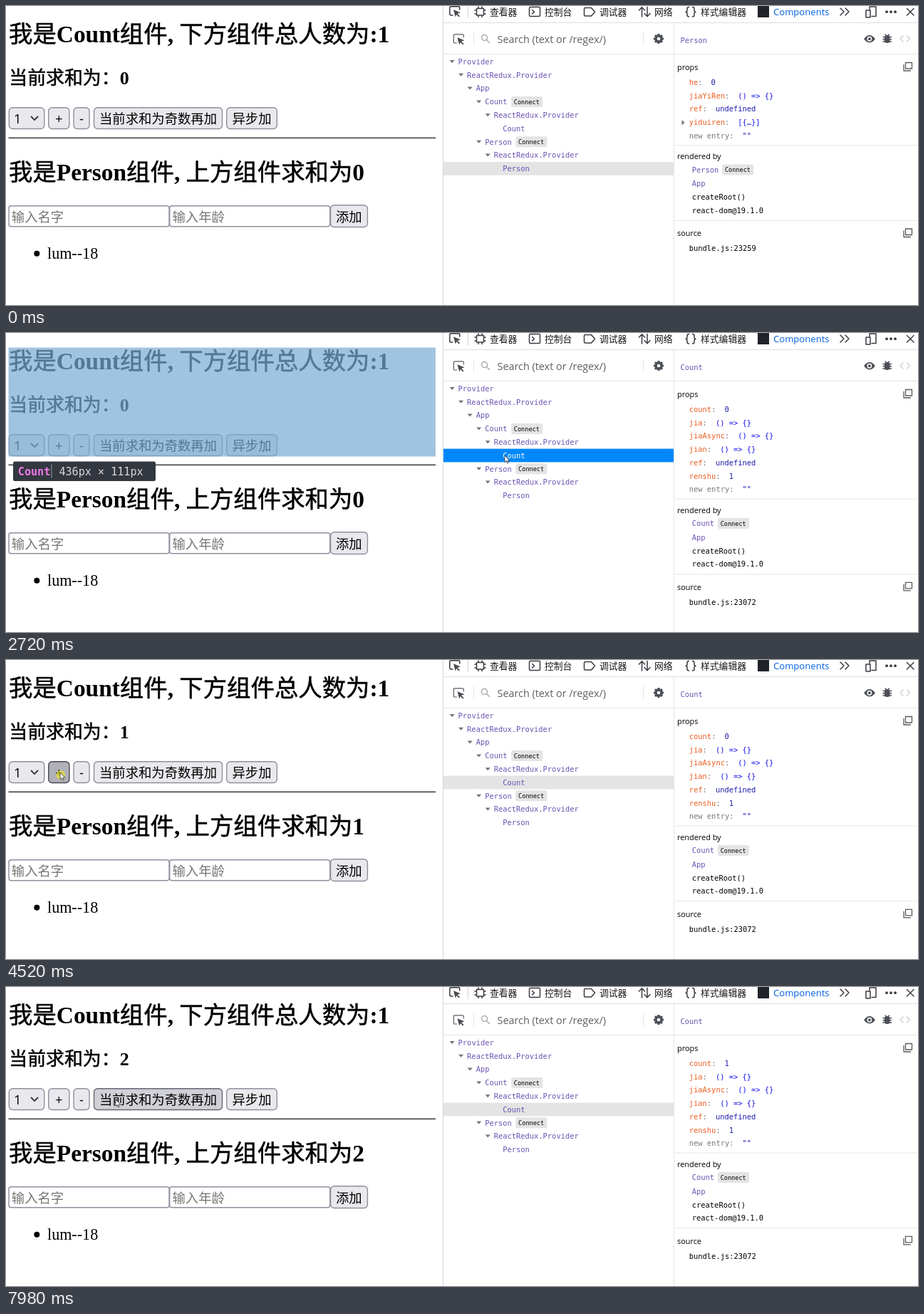
An HTML page that plays this animation: 1280 px wide and 420 px high, repeating every 8000 ms.

```html
<!DOCTYPE html>
<html lang="zh">
<head>
<meta charset="utf-8">
<style>
html, body { margin: 0; width: 100%; height: 100%; overflow: hidden; background: #fff; }
svg { display: block; width: 1280px; height: 420px; }
text { white-space: pre; }
.h { font: bold 33.4px "Liberation Serif", "Noto Sans CJK SC", serif; }
.h3 { font: bold 25.9px "Liberation Serif", "Noto Sans CJK SC", serif; }
.han { font-weight: 400; stroke: #000; stroke-width: .5; }
.li { font: 22.1px "Liberation Serif", serif; }
.btn { font: 18.35px "Open Sans", "Noto Sans CJK SC", sans-serif; }
.tab { font: 12.8px "Open Sans", "Noto Sans CJK SC", sans-serif; fill: #18181a; }
.ui { font: 10.9px "Open Sans", sans-serif; }
.find { font: 14.4px "Open Sans", sans-serif; }
.m { font: 10.42px "DejaVu Sans Mono", monospace; }
.badge { font: 8.55px "DejaVu Sans Mono", monospace; }
.tip { font: 15.1px "DejaVu Sans Mono", monospace; }
.ic { fill: none; stroke: #3b3b42; stroke-width: 1.5; stroke-linejoin: round; stroke-linecap: round; }
.thin { stroke-width: 1.2; stroke: #5a5a60; }
</style>
</head>
<body>
<svg id="stage" viewBox="0 0 1280 420" xmlns="http://www.w3.org/2000/svg"></svg>
<script>
const LOOP = 8000, LAG = 80, CH = 6.273;
const PURPLE = '#6a51b2', ORANGE = '#ec5c20', BLUE = '#1a1aa6', VIVID = '#1010ee', DIM = '#777';

const text = (x, y, cls, s, fill = '#000', more = '') =>
  `<text x="${x}" y="${y}" class="${cls}" fill="${fill}" ${more}>${s}</text>`;
const rect = (x, y, w, h, fill, more = '') =>
  `<rect x="${x}" y="${y}" width="${w}" height="${h}" fill="${fill}" ${more}/>`;
const icon = (d, more = '') => `<path class="ic" d="${d}" ${more}/>`;
const line = (x1, y1, x2, y2, c = '#e6e6e8') =>
  `<path d="M${x1} ${y1}L${x2} ${y2}" stroke="${c}" fill="none"/>`;
const badge = (x, y) =>
  rect(x, y - 7.5, 44, 15, '#e4e4e4', 'rx="2"') + text(x + 3.7, y + 3.2, 'badge', 'Connect');
// Chinese runs of a heading are lighter than its Latin letters
const heading = s => s.replace(/[^\x00-\x7f]+/g, '<tspan class="han">$&</tspan>');

/* ---- page ---- */
const buttons = [
  { x: 59.7, w: 29.2, s: '+' },
  { x: 95, w: 22, s: '-' },
  { x: 123.5, w: 180, s: '当前求和为奇数再加' },
  { x: 309.7, w: 70.6, s: '异步加' }
];
const LOOKS = [['#e9e9ed', '#8f8f9d'], ['#d0d0d7', '#676774'], ['#b1b1b9', '#484851']];
const face = (x, y, w, h, id = '') =>
  rect(x, y, w, h, LOOKS[0][0], `${id} rx="5" stroke="${LOOKS[0][1]}" stroke-width="1.4"`);
const input = (x, s) =>
  rect(x, 280.7, 225, 29, '#fff', 'rx="3" stroke="#8f8f9d" stroke-width="1.4"') +
  text(x + 3.8, 302.8, 'btn', s, '#757575');

function page() {
  return text(4, 50.6, 'h', heading('我是Count组件, 下方组件总人数为:1')) +
    text(4.3, 109.5, 'h3', '', '#000', 'id="sum"') +
    face(4.3, 142.7, 49.4, 29.8) + text(11, 164.7, 'btn', '1') +
    icon('M35.5 155.5l4.5 4.6 4.5-4.6', 'style="stroke-width:2"') +
    buttons.map((b, i) => face(b.x, 142.7, b.w, 29.8, `id="b${i}"`) +
      text(b.x + b.w / 2, 164.7, 'btn', b.s, '#000', 'text-anchor="middle"')).join('') +
    rect(3.5, 184.3, 599.5, 2, '#606060') +
    text(4, 244.5, 'h', '', '#000', 'id="upper"') +
    input(4, '输入名字') + input(229.7, '输入年龄') +
    face(455.6, 279.7, 51.8, 30.8) + text(463, 302.8, 'btn', '添加') +
    '<circle cx="43.3" cy="347.800" r="4"/>' + text(58, 354.6, 'li', 'lum--18');
}

/* ---- tool bars ---- */
const picker = (x, y, cls) =>
  `<g transform="translate(${x} ${y})"><path class="ic ${cls}" d="M5 13H2.5Q.8 13 .8 11.3V2.5Q.8 .8 2.5 .8H13Q14.8 .8 14.8 2.5V5"/>` +
  '<path d="M6 5.2L16 9.3 11.6 10.7 15 14.2 13.6 15.4 10.3 12 8.7 15.5Z" fill="#4a4a50"/></g>';
const copyIcon = y =>
  icon(`M1262.5 ${y}h9v8.5h-9zM1260 ${y + 3}v8.5h9.5`, 'style="stroke-width:1.3;stroke:#5a5a60"');

function bars() {
  const tabs = [[679, '查看器'], [756, '控制台'], [833, '调试器'], [910, '网络'], [975, '样式编辑器']];
  const teeth = [0, 45, 90, 135].map(a =>
    `<rect x="914.2" y="39" width="3.6" height="14" rx="1" transform="rotate(${a} 916 46)" fill="#4c4f57"/>`).join('');
  return line(613.5, 0, 613.5, 420, '#d4d4d8') + line(614, 23.5, 1280, 23.5, '#dedee2') +
    picker(622, 0, '') + line(648.5, 0, 648.5, 17, '#d4d4d8') +
    icon('M660.5 3.5h10v9.5h-10zM663 1v2M668 1v2M663 13v2.5M668 13v2.5M658 6h2M658 11h2M671 6h2M671 11h2') +
    icon('M736 1.5h12q1.5 0 1.5 1.5v10q0 1.5-1.5 1.5h-12q-1.5 0-1.5-1.5v-10q0-1.5 1.5-1.5M738.5 5.5l3 2.7-3 2.7') +
    icon('M813 2.5h8.5l5 5.7-5 5.7h-8.5q-1.5 0-1.5-1.5v-8.4q0-1.5 1.5-1.5') +
    icon('M892.5 15v-13M888.5 6l4-4.3 4 4.3M900 1.5v13M896 10.5l4 4.3 4-4.3') +
    icon('M958.5 1.5q-2.5 0-2.5 2.5v2q0 2-2 2.2 2 .2 2 2.2v2q0 2.5 2.5 2.5M963.5 1.5q2.5 0 2.5 2.5v2q0 2 2 2.2-2 .2-2 2.2v2q0 2.5-2.5 2.5') +
    rect(1055, 0, 16, 16, '#20232a') +
    tabs.map(([x, s]) => text(x, 12.8, 'tab', s)).join('') +
    text(1077, 12.8, 'tab', 'Components', '', 'style="fill:#0060df;font-size:13.1px"') +
    icon('M1171 3l5 5-5 5M1178 3l5 5-5 5') +
    icon('M1212 4.5v-3.5h9v13.5h-6M1207 6h6v10h-6z') +
    [1236, 1242, 1248].map(x => `<circle cx="${x}" cy="8.2" r="1.9" fill="#3b3b42"/>`).join('') +
    icon('M1264.5 3.5l9.5 9.5M1274 3.5l-9.5 9.5') +
    line(614, 67.5, 1280, 67.5) + line(937.5, 24, 937.5, 420) +
    picker(627.5, 39, 'thin') + line(656.5, 37, 656.5, 55) + line(894.5, 37, 894.5, 55) +
    '<circle class="ic" cx="671.5" cy="44.5" r="4" style="stroke:#aaa"/>' + icon('M674.5 47.5l4 4', 'style="stroke:#aaa"') +
    text(689.5, 51.8, 'find', 'Search (text or /regex/)', '#5f5f63') +
    teeth + '<circle cx="916" cy="46" r="3.8" fill="#fff" stroke="#4c4f57" stroke-width="3"/>' +
    '<path d="M1204 46.2Q1212 35.8 1220 46.2 1212 56.6 1204 46.2" fill="#4c4f57"/>' +
    '<circle cx="1211.9" cy="46.2" r="2.7" fill="#4c4f57" stroke="#fff" stroke-width="1.5"/>' +
    rect(1233, 41, 7.5, 11, '#4c4f57', 'rx="3.5"') +
    icon('M1231 43.5h11.5M1231 46.7h11.5M1231 50h11.5M1234 40l1.5 1.5M1239.5 40l-1.5 1.5', 'style="stroke:#4c4f57"') +
    icon('M1259 42l-4 4 4 4M1264.5 42l4 4-4 4', 'style="stroke:#cfcfd2"');
}

/* ---- component tree ---- */
const rowY = i => 78 + i * 18.8;
const nodes = [[0, 'Provider'], [1, 'ReactRedux.Provider'], [2, 'App'], [3, 'Count', 1],
  [4, 'ReactRedux.Provider'], [5, 'Count'], [3, 'Person', 1], [4, 'ReactRedux.Provider'], [5, 'Person']];

function tree() {
  return nodes.map(([depth, name, tag], i) => {
    const x = 634.6 + depth * 12.52, y = rowY(i);
    return rect(614, y - 9.4, 323, 18.8, 'none', `id="r${i}"`) +
      (depth < 5 ? `<path d="M${x - 12} ${y - 2}h7l-3.5 4z" fill="#70737a"/>` : '') +
      text(x, y + 3.7, 'm', name, PURPLE, `id="n${i}"`) +
      (tag ? badge(x + name.length * CH + 5.6, y) : '');
  }).join('');
}

/* ---- details panel ---- */
function prop([name, val, id], i) {
  const y = 107.2 + i * 18.75 + 3.7, x = 958.8, last = name === 'new entry';
  const end = x + name.length * CH;
  return text(x, y, 'm', name, last ? DIM : ORANGE) + text(end, y, 'm', ':', DIM) +
    text(end + CH + 12, y, 'm', val, /[({[]/.test(val) ? VIVID : BLUE, id ? `id="${id}"` : '') +
    (name === 'yiduiren' ? `<path d="M948.5 ${y - 7}v7l4-3.5z" fill="#70737a"/>` : '');
}
function panel(id, name, props, src) {
  const d = (props.length - 5) * 18.7;
  const item = (y, s, c = '#000') => text(962.8, y + d + 3.7, 'm', s, c);
  return `<g id="${id}">` + text(946.5, 51.8, 'm', name, PURPLE) + text(942, 90, 'ui', 'props') +
    copyIcon(79.5) + props.map(prop).join('') +
    line(938, 195.7 + d, 1280, 195.7 + d) + text(942, 215.3 + d, 'ui', 'rendered by') +
    item(230.2, name, PURPLE) + badge(963 + name.length * CH + 4.6, 230 + d) +
    item(249.6, 'App', PURPLE) + item(268.4, 'createRoot()') + item(287.3, 'react-dom@19.1.0') +
    line(938, 301.5 + d, 1280, 301.5 + d) + text(942, 323.3 + d, 'ui', 'source') + copyIcon(313 + d) +
    text(958.8, 344.2 + d, 'm', 'bundle.js:' + src) + '</g>';
}
const FN = '() =&gt; {}';
const panels =
  panel('person', 'Person', [['he', '0'], ['jiaYiRen', FN], ['ref', 'undefined'],
    ['yiduiren', '[{…}]'], ['new entry', '""']], 23259) +
  panel('count', 'Count', [['count', '0', 'prop'], ['jia', FN], ['jiaAsync', FN], ['jian', FN],
    ['ref', 'undefined'], ['renshu', '1'], ['new entry', '""']], 23072);

/* ---- overlay and pointer ---- */
const overlay = '<g id="mark">' + rect(3.5, 20.5, 599.3, 153, 'rgb(120,170,210)', 'fill-opacity=".7"') +
  rect(10, 180.5, 0, 27.5, '#333740', 'id="tipBox" rx="2.5"') +
  text(16.8, 199.6, 'tip', '', '#ee78e6', 'id="tipName" style="font-weight:bold"') +
  '<g id="tipSize">' + line(0.5, 184.5, 0.5, 203.5, '#9a9ca2') +
  text(11, 199.6, 'tip', '436px × 111px', '#d7d7d7') + '</g></g>';
const pointer = '<g id="cursor"><circle id="ring" cx=".8" cy="3.5" r="6.2" fill="#f0e428" fill-opacity=".7"/>' +
  '<path id="arrow" d="M0 0V9.5L2.2 7.6 3.7 11 5.2 10.3 3.8 7.1H6.7Z" fill="#fff" stroke="#333" stroke-width=".8"/>' +
  '<path id="beam" d="M-2-4.5H2M0-4.5V4.5M-2 4.5H2" fill="none" stroke="#666"/></g>';

document.getElementById('stage').innerHTML =
  rect(0, 0, 1280, 420, '#fff') + page() + bars() + tree() + panels + overlay + pointer;
const el = id => document.getElementById(id);
const set = (id, attrs) => { for (const k in attrs) el(id).setAttribute(k, attrs[k]); };
const show = (id, on) => set(id, { display: on ? 'inline' : 'none' });

/* ---- motion ---- */
const glide = Array.from({ length: 10 }, (_, i) => {
  const p = 1 - (1 - i / 9) ** 2;
  return [1140 - 1055 * p, 397 - 229 * p];
});
// pointer moves in steps: start, end, positions
const moves = [
  [160, 890, glide],
  [970, 1050, [[75, 163], [73, 161]]],
  [1300, 1300, [[72, 161]]],
  [1880, 2380, [[420, 160], [733, 156], [726, 156], [722, 159], [719, 166], [718, 173], [718, 173]]],
  [2550, 3280, [[718, 173], [718, 173], [700, 172], [600, 168], [500, 163], [400, 160], [331, 158],
    [314, 158], [290, 159], [284, 159]]],
  [3360, 3690, [[215, 159], [150, 159], [112, 159], [82, 159], [76, 158]]],
  [5190, 5350, [[121, 158], [108, 159], [108, 160]]],
  [5520, 6180, [[130, 159], [150, 158], [158, 159], [158, 159], [158, 159], [158, 159], [158, 159],
    [157, 159], [156, 159]]],
  [6350, 6990, [[156, 159], [156, 159], [156, 159], [147, 158], [132, 158], [121, 157], [108, 158],
    [106, 160], [105, 160]]],
  [7410, 7980, [[105, 160], [105, 160], [106, 160], [121, 159], [148, 158], [154, 158], [154, 158], [154, 158]]]
];
const presses = [[2550, 2700], [3930, 4100], [4520, 4680], [5760, 5920], [6010, 6090], [6350, 6500],
  [7410, 7570], [7890, 7972]];

function pointerAt(t) {
  let pos = null;
  for (const [a, b, pts] of moves) {
    if (t < a) break;
    const step = (b - a) / (pts.length - 1) || 80;
    pos = pts[Math.min(pts.length - 1, Math.floor((t - a + 8) / step))];
  }
  return pos;
}
// value of the last step reached: [time, value] pairs
const stage = (t, list) => list.reduce((v, [at, x]) => t >= at ? x : v, 0);

function draw(t) {
  const pos = pointerAt(t), [hx, hy] = pointerAt(t - LAG) || [-9, -9];
  const down = presses.some(([a, b]) => t >= a && t < b);

  const sum = stage(t, [[4100, 1], [4680, 2], [7570, 1], [7972, 2]]);
  el('sum').innerHTML = heading('当前求和为：' + sum);
  el('upper').innerHTML = heading('我是Person组件, 上方组件求和为' + sum);
  el('prop').textContent = stage(t, [[4760, 2], [7730, 1]]);

  buttons.forEach((b, i) => {
    const over = hx >= b.x && hx <= b.x + b.w && hy > 142 && hy < 173;
    const [fill, stroke] = LOOKS[over ? (down ? 2 : 1) : 0];
    set('b' + i, { fill, stroke });
  });

  const picked = t >= 2550, focus = picked && t < 3930, sel = picked ? 5 : 8;
  const row = hx > 614 && hx < 937 ? Math.round((hy - 78) / 18.8) : -1;
  const marked = row === 4 || row === 5;
  nodes.forEach((_, i) => {
    const on = i === sel;
    set('r' + i, { fill: on ? (focus ? '#0088fa' : '#e4e4e4') : marked && i === row ? '#e4f2fe' : 'none' });
    set('n' + i, { fill: on && focus ? '#fff' : PURPLE });
  });
  show('person', !picked);
  show('count', picked);

  show('mark', marked);
  if (marked) {
    const name = nodes[row][1], w = name.length * 9.09;
    el('tipName').textContent = name;
    set('tipBox', { width: w + 154.5 });
    set('tipSize', { transform: `translate(${w + 18} 0)` });
  }

  show('cursor', pos);
  if (pos) {
    const beam = pos[0] > 118 && pos[0] < 123;
    set('cursor', { transform: `translate(${pos[0]} ${pos[1]})` });
    show('ring', down);
    show('beam', beam);
    show('arrow', !beam);
  }
}

const start = performance.now();
function tick() {
  draw((performance.now() - start) % LOOP);
  requestAnimationFrame(tick);
}
tick();
</script>
</body>
</html>
```
